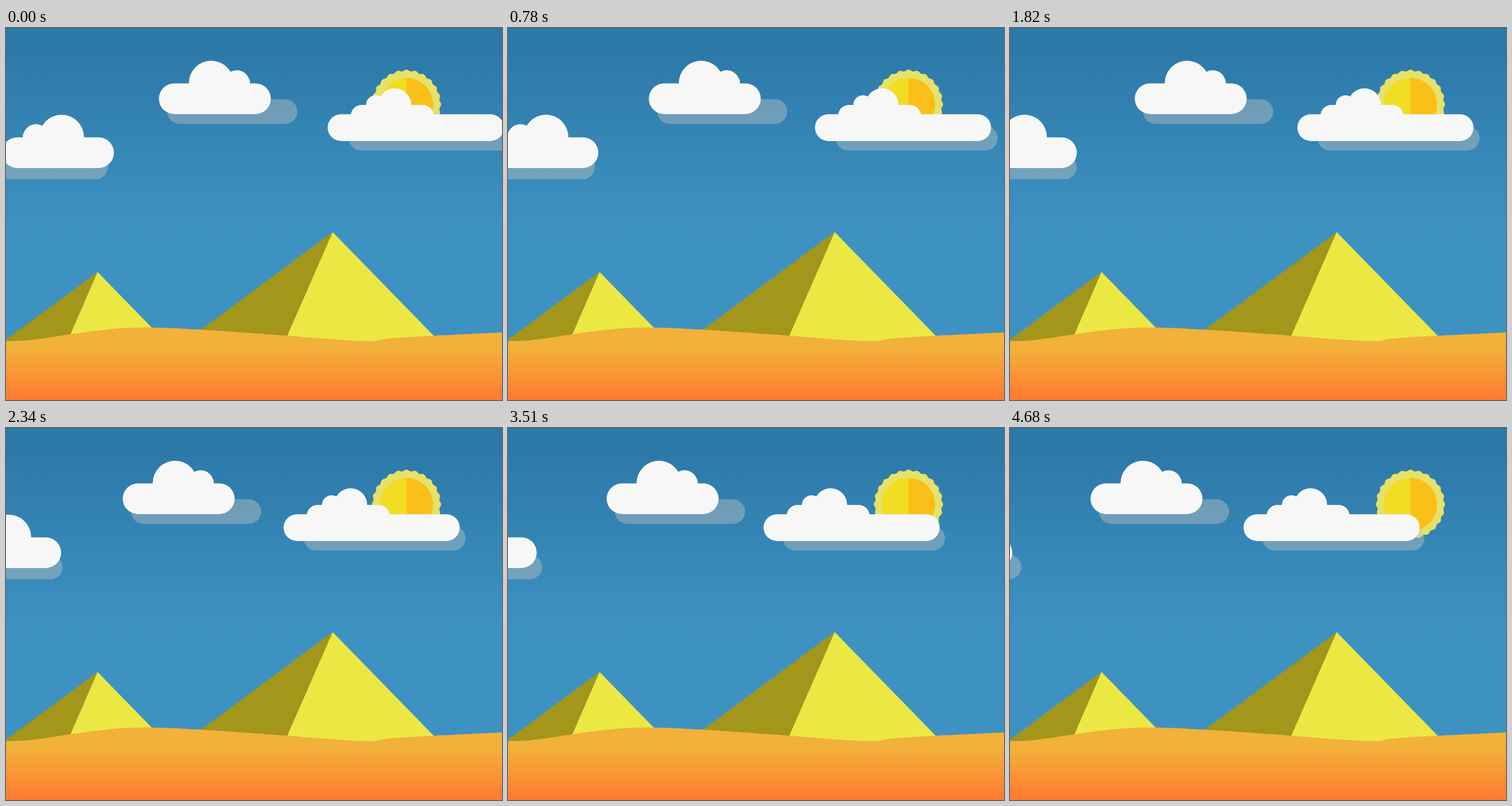
Write an HTML page that moves like this. It is 864 px wide and 648 px high and loops after 4.81 s.

```html
<!DOCTYPE html>
<html lang="en">
<head>
<meta charset="utf-8">
<title>Desert sky</title>
<style>
  html, body { margin: 0; width: 100%; height: 100%; overflow: hidden; background: #3e92c2; }
  svg { display: block; width: 100%; height: 100%; }
  .cloud { fill: #f7f7f7; }
  .shade { fill: #c4c4c0; fill-opacity: .42; }
  .lit { fill: #ebe844; }
  .dark { fill: #a2961b; }
</style>
</head>
<body>
<svg viewBox="0 0 864 648">
  <defs>
    <linearGradient id="sky" gradientUnits="userSpaceOnUse" x1="0" y1="35" x2="0" y2="355">
      <stop offset="0" stop-color="#2c79a8"/>
      <stop offset="1" stop-color="#3e92c2"/>
    </linearGradient>
    <linearGradient id="sand" gradientUnits="userSpaceOnUse" x1="0" y1="558" x2="0" y2="645">
      <stop offset="0" stop-color="#f2b139"/>
      <stop offset="1" stop-color="#ff7b31"/>
    </linearGradient>
    <g id="puff">
      <rect y="96.4" width="195" height="53.5" rx="26.75"/>
      <circle cx="91.2" cy="96" r="39"/>
      <circle cx="135.7" cy="96.2" r="22.7"/>
      <rect x="91" y="90" width="67.4" height="12"/>
    </g>
  </defs>

  <rect width="864" height="648" fill="url(#sky)"/>

  <path id="rays" fill="#e6e168"/>
  <circle cx="697.6" cy="133.3" r="46.3" fill="#f1dd22"/>
  <path d="M697.6 87a46.3 46.3 0 0 1 0 92.6z" fill="#fac019"/>

  <path class="dark" d="M159.5 425L-23 560H101z"/>
  <path class="lit" d="M159.5 425L100.7 560H291z"/>
  <path class="dark" d="M569 355.5L293.1 560H480z"/>
  <path class="lit" d="M569 355.5L479.5 560H768.4z"/>
  <path fill="url(#sand)" d="M0 545.2H15C45 545 80 538 112 533.5S190 521.7 240 521.7
    C300 521.7 420 531 490 536C540 539.8 600 545.4 638 545.4C645 545.6 648 545 652 543.6
    C665 540 700 538.5 745 536L864 530.3V648H0z"/>

  <rect id="leftShade" class="shade" x="-226.5" y="221" width="226.5" height="42.5" rx="21.25"/>
  <g id="left" class="cloud"><use href="#puff" transform="translate(0 94) scale(-1 1)"/></g>

  <rect id="midShade" class="shade" y="124.2" width="226.5" height="42.7" rx="21.35"/>
  <g id="mid" class="cloud"><use href="#puff"/></g>

  <rect id="rightShade" class="shade" y="170.6" width="282" height="42.8" rx="21.4"/>
  <g id="right" class="cloud">
    <rect y="150.2" width="306.8" height="46.7" rx="23.35"/>
    <path d="M40.2 156V153a19 19 0 0 1 19-19H165.7a19 19 0 0 1 19 19V156z"/>
    <circle cx="83.7" cy="134" r="16.8"/>
    <circle cx="116.8" cy="133.8" r="28.8"/>
  </g>
</svg>
<script>
  const STEP = 130, STEPS = 37;

  // id: [start x, pixels moved left per step]
  const drift = {
    left: [188, 5.111],
    leftShade: [177.5, 4.385],
    mid: [266.3, 3.5],
    midShade: [281, 3.5],
    right: [560.3, 4.264],
    rightShade: [597.2, 4.37]
  };
  const parts = Object.entries(drift).map(([id, [x, v]]) => ({ el: document.getElementById(id), x, v }));

  function scallop(cx, cy, r, depth, bumps) {
    const pts = [], n = bumps * 12;
    for (let i = 0; i < n; i++) {
      const a = i / n * 2 * Math.PI;
      const d = r + depth * Math.cos(a * bumps);
      pts.push((cx + d * Math.cos(a)).toFixed(2) + ' ' + (cy + d * Math.sin(a)).toFixed(2));
    }
    return 'M' + pts.join('L') + 'z';
  }
  document.getElementById('rays').setAttribute('d', scallop(697.6, 133, 59.1, 1.3, 24));

  function draw(ms) {
    const k = Math.floor(ms / STEP) % STEPS;
    for (const { el, x, v } of parts) {
      el.setAttribute('transform', `translate(${(x - v * k).toFixed(2)} 0)`);
    }
  }

  const start = performance.now();
  function tick() {
    draw(performance.now() - start);
    requestAnimationFrame(tick);
  }
  tick();
</script>
</body>
</html>
```
